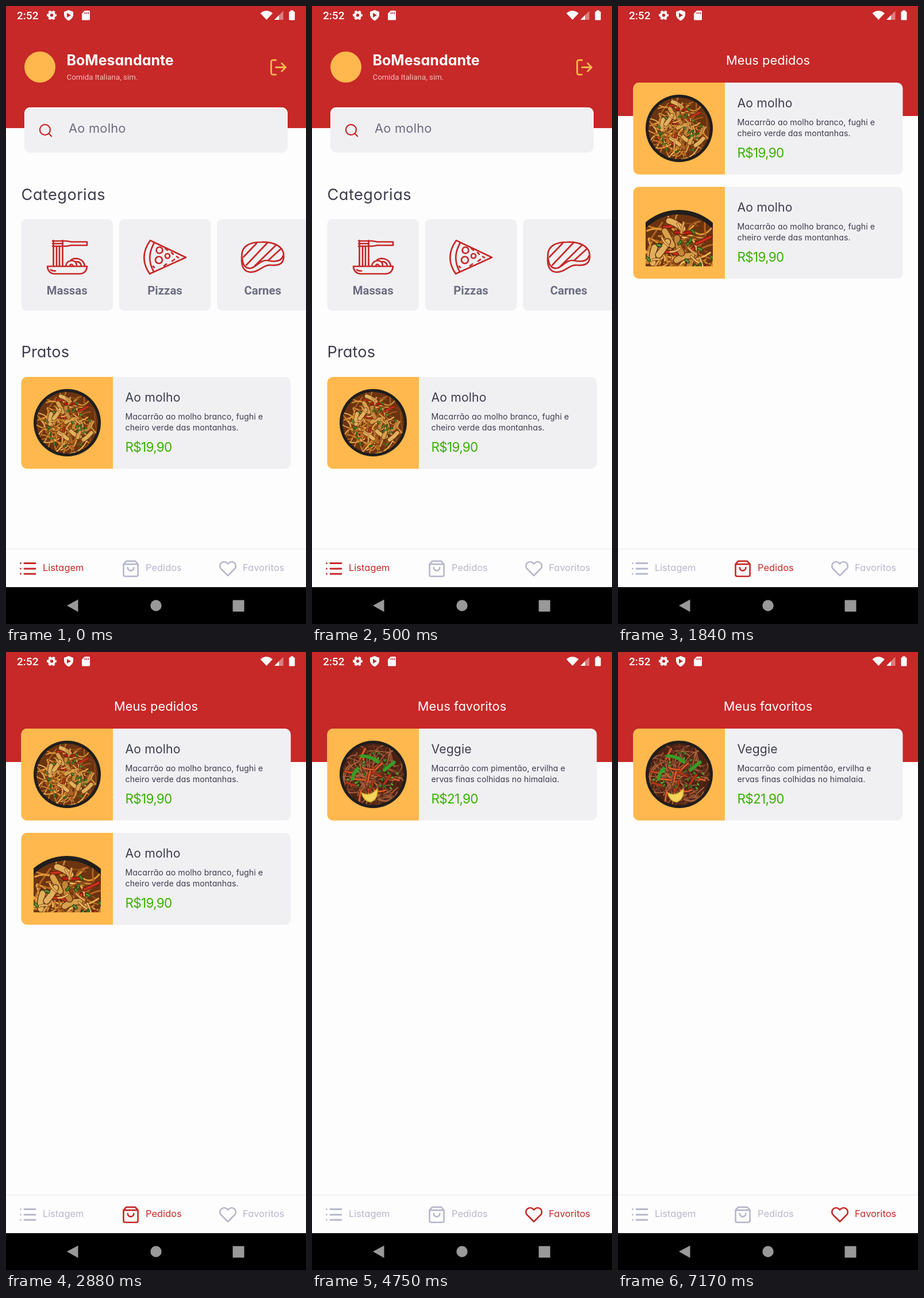
Animation of 522x1073 px, one loop 7250 ms. Source, as an HTML page:

```html
<!DOCTYPE html>
<html lang="pt-BR">
<head>
<meta charset="utf-8">
<title>Cardápio</title>
<style>
  html, body { margin: 0; width: 100%; height: 100%; overflow: hidden; background: #fdfdfd; }
  svg { display: block; width: 522px; height: 1073px; }
  text { font-family: Inter, sans-serif; font-feature-settings: "cv11"; font-optical-sizing: none; white-space: pre; }
  .roboto { font-family: Roboto, sans-serif; }
  .line { fill: none; stroke: currentColor; stroke-width: 2; stroke-linecap: round; stroke-linejoin: round; }
  .art .line { stroke-width: 2.7; }
  .tab { color: #b7b7cc; }
  .tab.on { color: #c72828; }
</style>
</head>
<body>
<svg id="stage" viewBox="0 0 522 1073" xmlns="http://www.w3.org/2000/svg"></svg>
<script>
const RED = '#c72828', ORANGE = '#ffb84d', CARD = '#f0f0f3', INK = '#3d3d4d', GREY = '#6c6c80', GREEN = '#39b100';
const LOOP = 7250;
const STEPS = [[0, 'list'], [1640, 'orders'], [4200, 'favs']];

const text = (x, y, size, fill, str, space = 0, more = '') =>
  `<text x="${x}" y="${y}" font-size="${size}" fill="${fill}" letter-spacing="${space}" ${more}>${str}</text>`;
const rect = (x, y, w, h, fill, r = 0, more = '') =>
  `<rect x="${x}" y="${y}" width="${w}" height="${h}" rx="${r}" fill="${fill}" ${more}/>`;
const circle = (x, y, r, fill, more = '') => `<circle cx="${x}" cy="${y}" r="${r}" fill="${fill}" ${more}/>`;
const path = (d, more = 'class="line"') => `<path d="${d}" ${more}/>`;
const icon = (x, y, scale, d, more = '') =>
  `<g transform="translate(${x} ${y}) scale(${scale})" ${more}>${path(d)}</g>`;

function random(seed) {
  return () => {
    seed = (seed * 1664525 + 1013904223) % 4294967296;
    return seed / 4294967296;
  };
}

// A plate of radius 58.5 around 0,0 with noodles and toppings
function dish(seed, base, noodles, toppings) {
  const rnd = random(seed);
  const pick = list => list[Math.floor(rnd() * list.length)];
  const n = v => v.toFixed(1);
  const stroke = (d, color, width) =>
    path(d, `fill="none" stroke="${color}" stroke-width="${width}" stroke-linecap="round"`);
  const curve = (reach, len, bend) => {
    const at = rnd() * 6.283, r = Math.sqrt(rnd()) * reach, a = rnd() * 6.283, b = (rnd() - .5) * bend;
    const x = Math.cos(at) * r, y = Math.sin(at) * r, dx = Math.cos(a) * len, dy = Math.sin(a) * len;
    return `M${n(x - dx)} ${n(y - dy)}Q${n(x - dy * b)} ${n(y + dx * b)} ${n(x + dx)} ${n(y + dy)}`;
  };
  let out = circle(0, 0, 58.5, '#211e1d') + `<g clip-path="url(#bowl)">` + circle(0, 0, 53.5, base);
  for (let i = 0; i < 130; i++) out += stroke(curve(50, 8 + rnd() * 12, 2.4), pick(noodles), 1.9);
  for (const [count, len, width, shade, ...colors] of toppings)
    for (let i = 0; i < count; i++) {
      const d = curve(45, len, 1);
      out += stroke(d, shade, width + 1.8) + stroke(d, pick(colors), width);
    }
  return out + '</g>';
}

const chicken = dish(7, '#6b3410', ['#e09a3a', '#b5651f', '#efb458', '#7b3e14', '#cc7f2b', '#8f4c18'], [
  [9, 9, 3, '#5a1d0c', '#b81f14', '#c9301b'],
  [12, 9, 6.5, '#5f2f10', '#d8a04a', '#e2b05c', '#c58538'],
  [14, 6, 1.3, '#a5621f', '#f0c77d', '#e8b866'],
  [22, 1.8, 1.8, '#2d4a15', '#4f8a2b', '#65993a', '#3d7522']
]);

const veggie = dish(21, '#4a2214', ['#7d4427', '#99583a', '#5a2917', '#b0643a', '#6b3420'], [
  [16, 10, 2.6, '#6b2712', '#d6491f', '#bd3517', '#e4602b'],
  [24, 1.2, 2.2, '#2c4a18', '#4a9a2c', '#6bb53a', '#388024']
]) +
  path('M-20 -32Q-5 -32 8 -22M-36 8Q-35 -3 -27 -10M20 -8L36 -21', 'fill="none" stroke="#369d27" stroke-width="6" stroke-linecap="round"') +
  path('M-20 32Q-6 40 7 25Q9 44 -5 48Q-17 46 -20 32Z', 'fill="#f4d45b" stroke="#d1ae2c" stroke-width="1.5"');

const SAUCE = ['Ao molho', 'Macarrão ao molho branco, fughi e', 'cheiro verde das montanhas.', 'R$19,90'];
const VEGGIE = ['Veggie', 'Macarrão com pimentão, ervilha e', 'ervas finas colhidas no himalaia.', 'R$21,90'];

function foodCard(y, food, [name, line1, line2, price], zoom) {
  const plate = zoom
    ? `<g clip-path="url(#photo)"><g transform="translate(79.5 129) scale(1.52)">${food}</g></g>`
    : `<g transform="translate(80 79.5)">${food}</g>`;
  return `<g transform="translate(26.5 ${y})">` +
    rect(0, 0, 469, 159.5, CARD, 10) +
    path('M10 0H159.5V159.5H10A10 10 0 0 1 0 149.5V10A10 10 0 0 1 10 0Z', `fill="${ORANGE}"`) +
    plate +
    text(181, 43, 21.2, INK, name, .15) +
    text(181, 73.5, 14.2, INK, line1, .03) +
    text(181, 92.5, 14.2, INK, line2, .03) +
    text(181, 129.5, 22.5, GREEN, price, -.7) + '</g>';
}

const pasta =
  path('M81 408H105L114 409.500H141V415.500H114L105 417H81M81 412.500H99') +
  path('M82.500 407V451M88 417V451M93 417V451M98.500 407V451') +
  path('M72 452H141Q140 464 129 465H84Q73 464 72 452Z') +
  path('M78 458Q80 460 86 460') +
  path('M104 451Q106 442 115 442Q123 443 123 451M111 451Q113 446 117 451M113 441Q118 437 126 439Q135 441 137 451M122 444Q129 443 131 451');

const pizza =
  path('M251 407Q230 436 250 465L313 436.500Z') +
  path('M258 411Q243 437 257 461') +
  [[267, 424, 5.5], [266, 441, 6], [281, 434, 4]].map(c => circle(...c, 'none', 'class="line"')).join('') +
  path('M277 421L281 424M275 451L279 448M288 428L291 431M289 443L293 440M297 435L300 437M256 452L258 454');

const steak =
  path('M410.500 431C411 417 424 410 444 410C467 409 482 418 483 431C485 447 476 451 462 450C447 448 441 463 424 462C410 460 409 446 410.500 431Z') +
  path('M411 438C412 451 418 457 427 455C438 451 443 440 456 442C470 445 479 443 482 434') +
  path('M413 436L436 412M418 450L455 411M433 451L470 415M457 441L479 421');

const category = (x, label, art) =>
  rect(x, 370, 159.5, 159, CARD, 9) + `<g class="art" color="${RED}">${art}</g>` +
  text(x + 79.7, 500.5, 20.3, GREY, label, 0, 'class="roboto" font-weight="700" text-anchor="middle"');

const listScreen =
  rect(0, 0, 522, 212, RED) +
  circle(59, 106, 27, ORANGE) +
  text(105.5, 103, 25, '#fff', 'BoMesandante', 0, 'font-weight="700"') +
  text(105.5, 127.5, 13.3, '#f2bcbc', 'Comida Italiana, sim.', 0, 'class="roboto"') +
  icon(457.2, 89.7, 1.4, 'M9 21H5a2 2 0 0 1-2-2V5a2 2 0 0 1 2-2h4M16 17l5-5-5-5M21 12H9', `color="${ORANGE}"`) +
  rect(32, 176, 458, 78.5, CARD, 10) +
  path('M33 212V186A9 9 0 0 1 42 177H480A9 9 0 0 1 489 186V212', 'fill="none" stroke="#fcfcfd" stroke-width="2"') +
  icon(55.5, 202.5, 1.13, 'M19 11a8 8 0 1 1-16 0a8 8 0 0 1 16 0ZM21 21l-4.350-4.350', `color="${RED}"`) +
  text(109, 219.5, 21.8, GREY, 'Ao molho', .25) +
  text(26.5, 336.5, 27.2, INK, 'Categorias', .45) +
  category(26.5, 'Massas', pasta) + category(196.8, 'Pizzas', pizza) + category(367, 'Carnes', steak) +
  text(26.5, 610, 27.2, INK, 'Pratos', .1) +
  foodCard(644, chicken, SAUCE);

const plainScreen = (title, cards) =>
  rect(0, 0, 522, 191, RED) +
  text(261, 102, 21.8, '#fff', title, .05, 'text-anchor="middle"') + cards;

const statusBar = `<g fill="#fff">` +
  text(19, 23, 19, '#fff', '2:52', 0, 'class="roboto" font-weight="500"') +
  circle(79.5, 16, 4.7, 'none', 'stroke="#fff" stroke-width="4"') +
  circle(79.5, 16, 7.2, 'none', 'stroke="#fff" stroke-width="2.600" stroke-dasharray="4 3.540" stroke-dashoffset="2"') +
  path('M109 7L117 10V16Q116 22 109 25.500Q102 22 101 16V10Z', '') +
  path('M106 12V20L113 16Z', `fill="${RED}"`) +
  path('M137 8H144.500Q146 8 146 9.500V23Q146 24.500 144.500 24.500H133.500Q132 24.500 132 23V13Z', '') +
  path('M137.500 10.500V14M140.500 10.500V14M143.500 10.500V14', `stroke="${RED}" stroke-width="1.400"`) +
  path('M442.500 12.500Q453 4 464 12.500L453.300 24Z', '') +
  path('M482.500 8.500V24H467Z', 'fill-opacity=".4"') +
  path('M475 16V24H467Z', '') +
  path('M495 9.500V7.500H500V9.500H501.500Q502.500 9.500 502.500 10.500V23.500Q502.500 24.500 501.500 24.500H493.500Q492.500 24.500 492.500 23.500V10.500Q492.500 9.500 493.500 9.500Z', '') +
  '</g>';

const tab = (id, x, label, art) =>
  `<g class="tab" data-tab="${id}">${art}${text(x, 981, 16.4, 'currentColor', label, .05)}</g>`;

const tabBar =
  rect(0, 942, 522, 67, '#fdfdfd') + rect(0, 942, 522, 1.5, '#efeff1') +
  tab('list', 64, 'Listagem',
    path('M32 967.500H51M32 977H51M32 986H51M25.500 967.500h.01M25.500 977h.01M25.500 986h.01',
      'class="line" style="stroke-width:2.800"')) +
  tab('orders', 243, 'Pedidos',
    icon(201.2, 961.2, 1.32, 'M6 2L2.500 6V20a2 2 0 0 0 2 2H19.500a2 2 0 0 0 2-2V6L18 2ZM2.500 6H21.500M16 10.500a4 4 0 0 1-8 0')) +
  tab('favs', 412, 'Favoritos',
    icon(370.2, 961, 1.32, 'M20.840 4.610a5.500 5.500 0 0 0-7.780 0L12 5.670l-1.060-1.060a5.500 5.500 0 0 0-7.780 7.780l1.060 1.060L12 21.230l7.780-7.780l1.060-1.060a5.500 5.500 0 0 0 0-7.780Z'));

const navBar =
  rect(0, 1009, 522, 64, '#000') +
  path('M106 1041L125.500 1030.500V1052Z', 'fill="#999"') +
  circle(261, 1041, 9.7, '#999') + rect(394.5, 1031.5, 20, 20, '#999', 1);

const screen = (id, body) => `<g data-screen="${id}" display="none">${body}</g>`;

const stage = document.getElementById('stage');
stage.innerHTML =
  `<defs><clipPath id="bowl">${circle(0, 0, 53.5, '#000')}</clipPath>` +
  `<clipPath id="photo">${rect(21.5, 40, 117, 98, '#000')}</clipPath></defs>` +
  rect(0, 0, 522, 1073, '#fdfdfd') +
  screen('list', listScreen) +
  screen('orders', plainScreen('Meus pedidos', foodCard(133, chicken, SAUCE) + foodCard(314, chicken, SAUCE, true))) +
  screen('favs', plainScreen('Meus favoritos', foodCard(133, veggie, VEGGIE))) +
  statusBar + tabBar + navBar;

const screens = [...stage.querySelectorAll('[data-screen]')];
const tabs = [...stage.querySelectorAll('[data-tab]')];
const start = performance.now();
let shown;

function show(id) {
  if (id === shown) return;
  shown = id;
  screens.forEach(s => s.setAttribute('display', s.dataset.screen === id ? 'inline' : 'none'));
  tabs.forEach(t => t.classList.toggle('on', t.dataset.tab === id));
}

function tick() {
  const time = Math.max(0, performance.now() - start) % LOOP;
  show(STEPS.filter(([at]) => at <= time).pop()[1]);
  requestAnimationFrame(tick);
}
tick();
</script>
</body>
</html>
```
